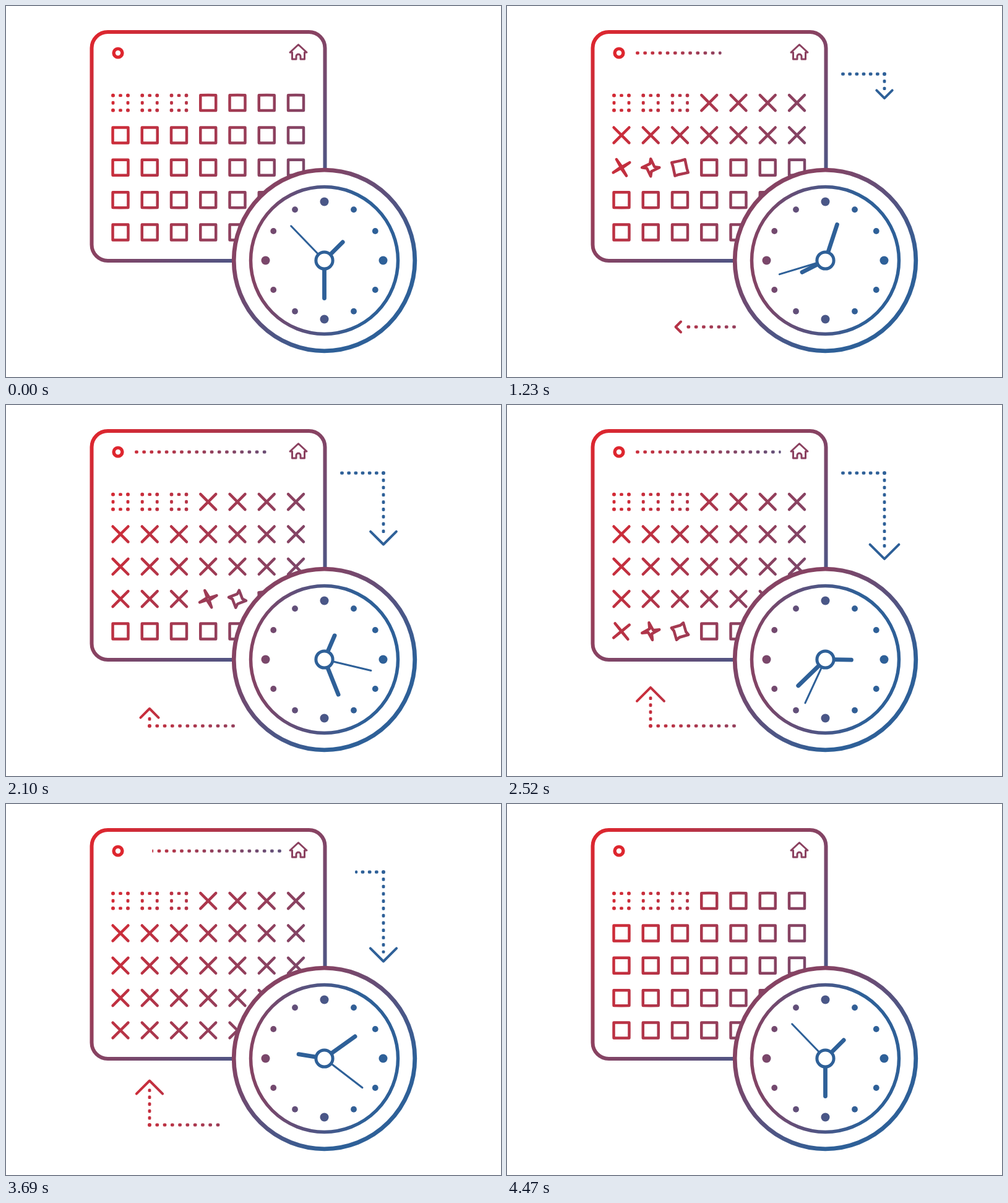
Animation, 800 px wide and 600 px high, one loop 4500 ms. Source, as an HTML page with a canvas:

```html
<!DOCTYPE html>
<html lang="en">
<head>
<meta charset="utf-8">
<title>Calendar and clock</title>
<style>
html, body { margin: 0; width: 100%; height: 100%; overflow: hidden; background: #fff; }
canvas { display: block; }
</style>
</head>
<body>
<canvas width="800" height="600"></canvas>
<script>
const ctx = document.querySelector('canvas').getContext('2d');
const LOOP = 4500, END = 4470, TAU = Math.PI * 2;
const RED = [222, 38, 46], BLUE = [46, 96, 152];
const CX = 514.5, CY = 411.5;

const clamp = u => Math.max(0, Math.min(1, u));
const mix = k => `rgb(${RED.map((c, i) => c + (BLUE[i] - c) * k)})`;

// Gradient along a line, from blend a to blend b.
function gradient(x0, y0, x1, y1, a = 0, b = 1) {
  const g = ctx.createLinearGradient(x0, y0, x1, y1);
  g.addColorStop(0, mix(a));
  g.addColorStop(1, mix(b));
  return g;
}

const blue = mix(1);
const paint = {
  frame: gradient(142, 46, 512, 408),
  cells: gradient(150, 100, 753, 359),
  header: gradient(208, 0, 445, 0, 0.1, 0.72),
  backArrow: gradient(210, 0, 370, 0, 0.1, 0.42),
  rim: gradient(441, 338, 588, 485, 0.5, 1),
  dial: gradient(395, 0, 570, 0, 0.5, 1)
};

// Steady start, soft landing: cubic-bezier(1/6, 1/6, 2/3, 1).
function easeOut(u) {
  u = clamp(u);
  let lo = 0, hi = 1;
  for (let i = 0; i < 20; i++) {
    const s = (lo + hi) / 2, r = 1 - s;
    if (r * r * s / 2 + 2 * r * s * s + s ** 3 < u) lo = s; else hi = s;
  }
  const r = 1 - lo;
  return r * r * lo / 2 + 3 * r * lo * lo + lo ** 3;
}
const smooth = u => u * u * (3 - 2 * u);

function stroke(points, color, width, closed) {
  ctx.beginPath();
  points.forEach(([x, y]) => ctx.lineTo(x, y));
  if (closed) ctx.closePath();
  ctx.strokeStyle = color;
  ctx.lineWidth = width;
  ctx.stroke();
}

function circle(x, y, r, fill, line, width) {
  ctx.beginPath();
  ctx.arc(x, y, r, 0, TAU);
  if (fill) { ctx.fillStyle = fill; ctx.fill(); }
  if (line) { ctx.strokeStyle = line; ctx.lineWidth = width; ctx.stroke(); }
}

// Axis-aligned path with dashes centred on its corners, cut to [from, to].
function dashes(points, color, from = -9, to = 1e4) {
  let start = 0;
  ctx.fillStyle = color;
  for (let k = 1; k < points.length; k++) {
    const [x, y] = points[k - 1], dx = points[k][0] - x, dy = points[k][1] - y;
    const length = Math.abs(dx + dy), n = Math.round(length / 12);
    for (let i = 0; i <= n; i++) {
      const d = start + length * i / n;
      const lo = Math.max(d - 2.8, from), hi = Math.min(d + 2.8, to);
      if (hi <= lo) continue;
      const m = ((lo + hi) / 2 - start) / length;
      const w = dx ? hi - lo : 4.8, h = dy ? hi - lo : 4.8;
      ctx.beginPath();
      ctx.roundRect(x + dx * m - w / 2, y + dy * m - h / 2, w, h, Math.min(1.6, w / 2, h / 2));
      ctx.fill();
    }
    start += length;
  }
}

// Square (u = 0) spinning and folding into a cross (u = 1).
function cell(x, y, u) {
  const s = smooth(u), turn = -Math.PI / 4 * (u + s);
  const tip = 17.6 - 3.5 * Math.sin(Math.PI * u), dent = 12.5 * (1 - s);
  const lag = 0.6 * Math.sin(Math.PI * u);
  const points = [];
  for (let i = 0; i < 8; i++) {
    const r = i % 2 ? dent : tip;
    const a = Math.PI / 4 * (i + 1) + turn + (i % 2 ? lag : 0);
    points.push([x + r * Math.cos(a), y + r * Math.sin(a)]);
  }
  stroke(points, paint.cells, 4.5, true);
}

function calendar(t, gone) {
  ctx.beginPath();
  ctx.roundRect(138.5, 42, 377, 370, 26);
  ctx.strokeStyle = paint.frame;
  ctx.lineWidth = 6;
  ctx.stroke();

  circle(181, 76, 6.9, null, mix(0), 5.4);
  dashes([[211, 76], [442, 76]], paint.header, 237 * gone - 3, 237 * easeOut(t / 2700) - 3);

  ctx.beginPath();
  for (const [x, y] of [[469, 86], [462.5, 86], [462.5, 75], [459, 75], [472.5, 62.5],
    [486, 75], [482.5, 75], [482.5, 86], [476, 86]]) ctx.lineTo(x, y);
  ctx.arc(472.5, 81.5, 3.5, 0, Math.PI, true);
  ctx.closePath();
  ctx.strokeStyle = mix(0.47);
  ctx.lineWidth = 3;
  ctx.stroke();

  const unfold = clamp((t - 3840) / 630);
  for (let i = 0; i < 35; i++) {
    const x = 185 + 47.25 * (i % 7), y = 156.6 + 52.35 * Math.floor(i / 7);
    if (i < 3) {
      const l = x - 12, r = x + 12, a = y - 12, b = y + 12;
      dashes([[l, a], [r, a], [r, b], [l, b], [l, a]], paint.cells);
    } else {
      cell(x, y, Math.min(clamp((t - (i - 3) * 90) / 300), 1 - unfold));
    }
  }
}

// Runs sideways until turnTime, then bends towards the end point.
function arrow(t, gone, [x0, y0], [x1, y1], dashEnd, turnTime, color) {
  if (t <= 0 || gone >= 1) return;
  const sx = Math.sign(x1 - x0), sy = Math.sign(y1 - y0);
  const w = Math.abs(x1 - x0), h = Math.abs(y1 - y0);
  const bend = easeOut((t - turnTime) / (2790 - turnTime));
  const side = t < turnTime;
  const run = side ? 10 + (w - 10) * t / turnTime : w + h * bend;
  dashes([[x0 + 3 * sx, y0], [x1, y0], [x1, dashEnd]], color,
    (w + h - 13) * gone - 3, run - 16);

  const size = (8.5 + 15.5 * bend) * (1 - gone);
  const x = side ? x0 + sx * run : x1, y = side ? y0 : y0 + sy * h * bend;
  const ux = side ? sx : 0, uy = side ? 0 : sy;
  const wing = k => [x - size * (ux + k * uy), y - size * (uy + k * ux)];
  stroke([wing(1), [x, y], wing(-1)], color, 4);
}

function hand(degrees, length, width) {
  const a = degrees * Math.PI / 180, s = Math.sin(a), c = -Math.cos(a);
  stroke([[CX + 14 * s, CY + 14 * c], [CX + length * s, CY + length * c]], blue, width);
}

function clock(t) {
  circle(CX, CY, 146.3, '#fff', paint.rim, 6.8);
  circle(CX, CY, 119, null, paint.dial, 5.5);
  for (let i = 0; i < 12; i++) {
    const a = TAU * i / 12;
    circle(CX + 95 * Math.cos(a), CY + 95 * Math.sin(a), i % 3 ? 4.9 : 7, paint.dial);
  }
  const turn = 360 * t / END;
  hand(316 + 3 * turn, 77.5, 3);
  hand(45 + 2 * turn, 42, 6.8);
  hand(180 + 2 * turn, 61, 6.8);
  circle(CX, CY, 13.6, '#fff', blue, 5);
}

function draw(now) {
  const t = Math.min(now % LOOP, END);
  const gone = 1 - easeOut(1 - (t - 3420) / 1050);
  ctx.fillStyle = '#fff';
  ctx.fillRect(0, 0, 800, 600);
  ctx.lineCap = ctx.lineJoin = 'round';
  calendar(t, gone);
  arrow(t, gone, [540, 110], [610, 254.5], 239.5, 810, blue);
  arrow(t, gone, [370, 519], [232, 447.5], 463, 1800, paint.backArrow);
  clock(t);
}

let begin;
function tick(now) {
  begin ??= now;
  draw(now - begin);
  requestAnimationFrame(tick);
}
requestAnimationFrame(tick);
</script>
</body>
</html>
```
